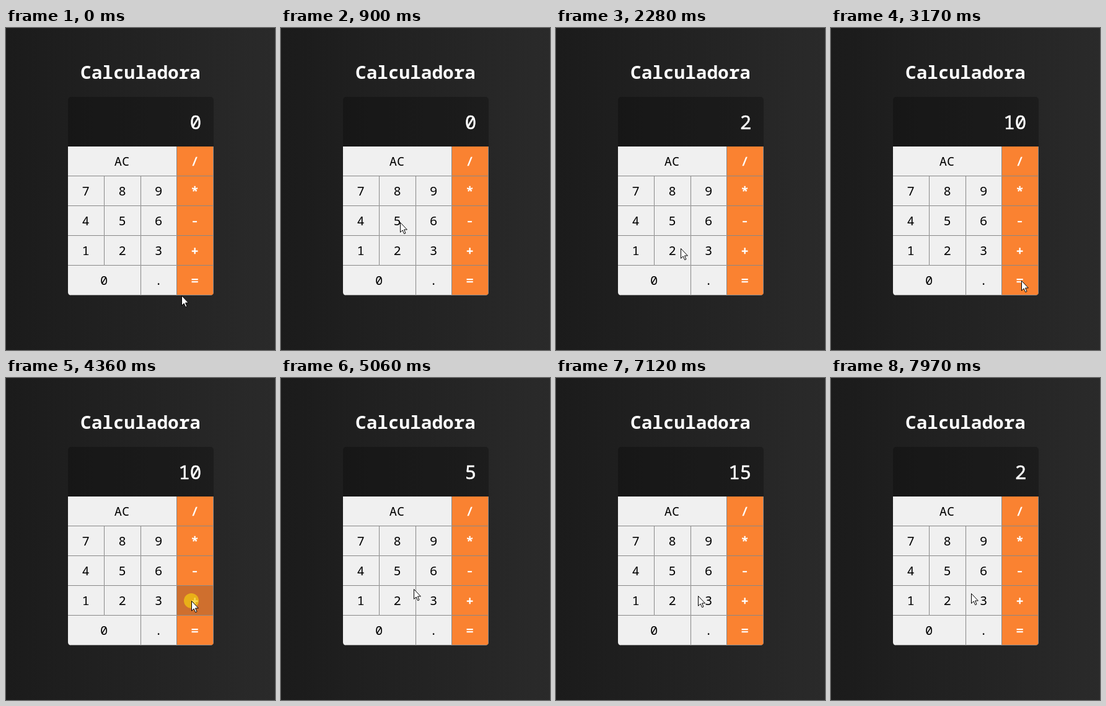
These frames come from a looping animation (434x519 px, 8 s). An HTML page:

```html
<!DOCTYPE html>
<html lang="pt">
<head>
<meta charset="utf-8">
<title>Calculadora</title>
<style>
  html, body { margin: 0; width: 100%; height: 100%; overflow: hidden; background: #222; }
  svg { display: block; width: 434px; height: 519px; font-family: "Noto Sans Mono", "DejaVu Sans Mono", monospace; }
  .title { font-size: 29.4px; font-weight: 700; fill: #fff; text-anchor: middle; }
  .display { font-size: 30.8px; fill: #fff; stroke: #fff; stroke-width: .5px; text-anchor: end; }
  .key { font-size: 20.4px; text-anchor: middle; }
  .operator { fill: #fff; stroke: #fff; stroke-width: .7px; }
</style>
</head>
<body>
<svg viewBox="0 0 434 519">
  <defs>
    <linearGradient id="bg">
      <stop offset="0" stop-color="#1b1b1b"/>
      <stop offset="1" stop-color="#2a2a2a"/>
    </linearGradient>
    <clipPath id="body"><rect x="100" y="111" width="235" height="320" rx="5"/></clipPath>
  </defs>
  <rect width="434" height="519" fill="url(#bg)"/>
  <text class="title" x="217" y="82">Calculadora</text>
  <g clip-path="url(#body)">
    <rect x="100" y="111" width="235" height="80" fill="#0004"/>
    <g id="keys"></g>
  </g>
  <text class="display" id="display" x="315.3" y="163"></text>
  <g id="pointer">
    <circle id="halo" r="12" fill="rgba(243,204,15,.7)"/>
    <path d="M.5 .5V16.3L4.1 12.9L6.7 18.7L9 17.7L6.5 12H11.4Z" fill="#fff" stroke="#000"/>
  </g>
</svg>
<script>
const LOOP = 8000;
const HOLD = 140;
const SETTLE = 70;
const LEFT = 100, TOP = 191, WIDTH = 235, ROW = 48;
const layout = ['AAA/', '789*', '456-', '123+', '00.='];
const byId = id => document.getElementById(id);

// Pointer stops: time, x, y and the key pressed there, if any
const stops = [
  [0, 283, 431],
  [770, 192, 313],
  [970, 192, 313, '5'],
  [1730, 300, 277, '*'],
  [2130, 200, 355, '2'],
  [2560, 306, 406, '='],
  [3170, 307, 407],
  [3940, 274, 315],
  [4290, 299, 359, '+'],
  [4850, 181, 318, '5'],
  [5270, 305, 401, '='],
  [5740, 305, 401],
  [5880, 290, 371],
  [6370, 291, 311],
  [6770, 291, 311, '-'],
  [7120, 229, 351],
  [7330, 205, 354, '2'],
  [7970, 226, 347]
].map(([time, x, y, key]) => ({ time, x, y, key }));
const presses = stops.filter(stop => stop.key);

const operations = {
  '+': (a, b) => a + b,
  '-': (a, b) => a - b,
  '*': (a, b) => a * b,
  '/': (a, b) => a / b
};

function calculate(typed) {
  let shown = '0', stored = 0, operator = null, fresh = true;
  for (const key of typed) {
    if (/[\d.]/.test(key)) {
      shown = fresh ? key : shown + key;
      fresh = false;
    } else {
      if (operator) shown = String(operations[operator](stored, Number(shown)));
      stored = Number(shown);
      operator = key === '=' ? null : key;
      fresh = true;
    }
  }
  return shown;
}

function add(tag, attributes, text = '') {
  const node = document.createElementNS('http://www.w3.org/2000/svg', tag);
  for (const name in attributes) node.setAttribute(name, attributes[name]);
  node.textContent = text;
  byId('keys').append(node);
  return node;
}

const edge = column => LEFT + Math.round(column * WIDTH / 4);
const keys = {};
layout.forEach((row, r) => {
  for (const char of new Set(row)) {
    const x = edge(row.indexOf(char));
    const right = edge(row.lastIndexOf(char) + 1);
    const y = TOP + r * ROW;
    const isOperator = char === row[3];
    const box = { x, y, width: right - x, height: ROW };
    add('rect', { ...box, fill: '#222' });
    const face = add('rect', box);
    add('path', { d: `M${right - .5} ${y}v${ROW - .5}H${x}`, fill: 'none', stroke: '#888' });
    add('text', { class: isOperator ? 'key operator' : 'key', x: (x + right) / 2 - 1, y: y + 31 },
      char === 'A' ? 'AC' : char);
    keys[char] = { face, up: isOperator ? '#fa8231' : '#f0f0f0', down: isOperator ? '#fa8231cc' : '#ccc' };
  }
});

function pointerAt(t) {
  const next = stops.findIndex(stop => stop.time > t);
  if (next < 0) return stops.at(-1);
  const a = stops[next - 1], b = stops[next];
  const start = a.time + (a.key ? HOLD : 0);
  const end = b.time - (b.key ? SETTLE : 0);
  const k = Math.min(1, Math.max(0, (t - start) / (end - start)));
  const ease = k * k * (3 - 2 * k);
  const mix = axis => Math.round(a[axis] + (b[axis] - a[axis]) * ease);
  return { x: mix('x'), y: mix('y') };
}

function draw() {
  const t = performance.now() % LOOP;
  const { x, y } = pointerAt(t);
  const press = presses.find(({ time }) => t >= time && t < time + HOLD);
  byId('pointer').setAttribute('transform', `translate(${x} ${y})`);
  byId('halo').setAttribute('visibility', press ? 'visible' : 'hidden');
  for (const char in keys) {
    const { face, up, down } = keys[char];
    face.setAttribute('fill', press?.key === char ? down : up);
  }
  const typed = presses.filter(({ time }) => t >= time + HOLD).map(({ key }) => key);
  byId('display').textContent = calculate(typed);
  requestAnimationFrame(draw);
}
draw();
</script>
</body>
</html>
```
